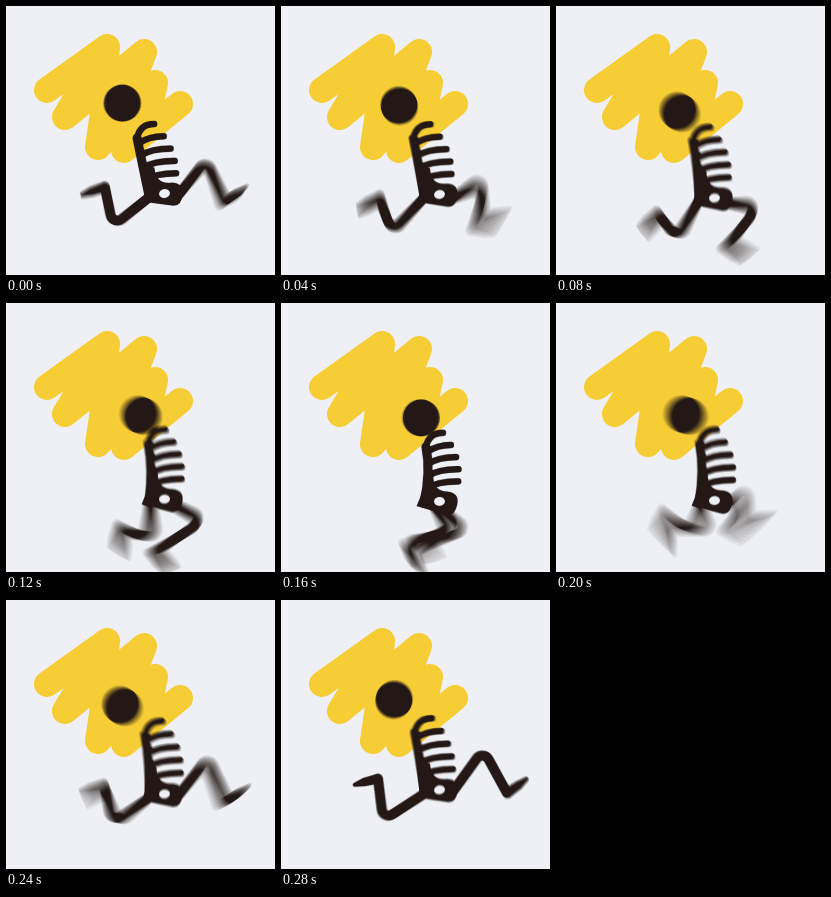
An HTML page with a canvas that plays this animation: 269 px wide and 269 px high, repeating every 0.32 s.

```html
<!DOCTYPE html>
<html lang="en">
<head>
<meta charset="utf-8">
<title>Running skeleton</title>
<style>
  html, body { margin: 0; width: 100%; height: 100%; overflow: hidden; background: #eef0f5; }
  canvas { display: block; width: 100vw; height: 100vh; }
</style>
</head>
<body>
<canvas id="stage" width="269" height="269"></canvas>
<script>
const SIZE = 269, LOOP = 320, STEP = 40, TAU = 2 * Math.PI;
const SHUTTER = 26, SAMPLES = 16;
const INK = '#231815', YELLOW = '#f7cd35', PAPER = '#eef0f5';

const newLayer = () => {
  const canvas = document.createElement('canvas');
  canvas.width = canvas.height = SIZE;
  return canvas.getContext('2d');
};
const stage = document.getElementById('stage').getContext('2d');
const figure = newLayer();
const exposure = newLayer();

const SCRIBBLE = new Path2D(
  'M41 84L101 41L59 111L97 80L101 41M97 80L138 46L128 72L98 100L92 141L149 77L143 105L118 144L174 98');

// Pelvis outline around its hole
const PELVIS = new Path2D(
  'M-22 8Q-17 -8 -18 -28L-10 -26Q-9 -9 7 -11Q19 -11 18 1Q17 13 8 12Q-8 10 -22 8Z');

// Closed paths of the joints over one stride, which takes two loops
const KNEE = [[200, 154], [202, 201], [183, 228], [108, 223], [107, 220], [121, 232], [170, 227], [201, 159]];
const ANKLE = [[218, 195], [172, 239], [128, 246], [99, 187], [99, 181], [103, 209], [138, 237], [219, 201]];

// Point on a smooth closed curve through the given points, phase 0 to 1
function along(points, phase) {
  const n = points.length, k = (phase % 1 + 1) % 1 * n;
  const i = Math.floor(k), u = k - i;
  const [a, b, c, d] = [-1, 0, 1, 2].map(j => points[(i + j + n) % n]);
  return [0, 1].map(q => b[q] + u / 2 * (c[q] - a[q]
    + u * (2 * a[q] - 5 * b[q] + 4 * c[q] - d[q] + u * (3 * (b[q] - c[q]) + d[q] - a[q]))));
}

function bodyAt(time) {
  const w = TAU * time / LOOP;
  const cos = Math.cos(w), sin = Math.sin(w), cos2 = Math.cos(2 * w);
  return {
    head: [124 - 12 * cos + 3.7 * sin + 4.4 * cos2, 106 - 9 * cos],
    neck: [136 - 7 * cos - sin, 130.5 - 6 * cos + 1.5 * cos2],
    pelvis: [158.5, 193 - 5.5 * cos - sin],
    lean: .5 - .5 * cos
  };
}

function drawLeg(c, time, pelvisY) {
  const phase = time / (2 * LOOP);
  const knee = along(KNEE, phase), ankle = along(ANKLE, phase);
  const swing = Math.max(-1, Math.min(1, 2 * Math.cos(TAU * phase)));
  c.lineWidth = 10;
  c.beginPath();
  c.moveTo(155.5 + 14 * swing, pelvisY + 5);
  c.arcTo(...knee, ...ankle, 7);
  c.lineTo(...ankle);
  c.stroke();

  // The foot stands square to the shin and tapers to the toe
  const shin = Math.atan2(ankle[1] - knee[1], ankle[0] - knee[0]);
  c.save();
  c.translate(...ankle);
  c.rotate(shin - 1.7);
  c.lineWidth = 4;
  c.beginPath();
  c.moveTo(0, -3);
  c.lineTo(14, -2);
  c.lineTo(24, 0);
  c.lineTo(14, 2.5);
  c.lineTo(0, 3);
  c.closePath();
  c.fill();
  c.stroke();
  c.restore();
}

function drawTorso(c, { neck, pelvis, lean }) {
  const [nx, ny] = neck, length = pelvis[1] - ny;
  const top = [nx + 2, ny + 6], hip = [143, pelvis[1] + 2];
  const bend = [nx + 7, (ny + hip[1]) / 2 - 1];

  c.lineWidth = 9;
  c.beginPath();
  c.moveTo(...top);
  c.quadraticCurveTo(...bend, ...hip);
  c.stroke();

  // Five ribs; the highest one hooks over from the end of the spine
  c.lineWidth = 6.5;
  for (let i = 0; i < 5; i++) {
    const u = i * .18, v = 1 - u;
    const x = top[0] * v * v + 2 * bend[0] * u * v + hip[0] * u * u;
    const tipX = nx + 20 + 22 * (1 - (1 - i / 4) ** 2) - 1.7 * lean * i;
    const tipY = ny - 8 + .2 * length * i;
    const rise = i ? 7 : 14;
    c.beginPath();
    c.moveTo(x, tipY + rise);
    c.quadraticCurveTo(x + (i ? 10 : 3), tipY, tipX - 1, tipY);
    c.stroke();
  }

  c.save();
  c.translate(...pelvis);
  c.rotate(lean * .15);
  c.fill(PELVIS);
  c.globalCompositeOperation = 'destination-out';
  c.beginPath();
  c.ellipse(0, 0, 5.5, 4.5, -.2, 0, TAU);
  c.fill();
  c.restore();
}

function drawFigure(c, time) {
  const body = bodyAt(time);
  c.clearRect(0, 0, SIZE, SIZE);
  c.lineCap = c.lineJoin = 'round';
  drawLeg(c, time, body.pelvis[1]);
  drawLeg(c, time + LOOP, body.pelvis[1]);
  drawTorso(c, body);
  c.beginPath();
  c.arc(...body.head, 18.5, 0, TAU);
  c.fill();
}

function draw(time) {
  stage.fillStyle = PAPER;
  stage.fillRect(0, 0, SIZE, SIZE);
  stage.strokeStyle = YELLOW;
  stage.lineWidth = 26;
  stage.lineCap = stage.lineJoin = 'round';
  stage.stroke(SCRIBBLE);

  // Motion blur: average several moments around this one, then tint
  exposure.clearRect(0, 0, SIZE, SIZE);
  exposure.globalCompositeOperation = 'lighter';
  exposure.globalAlpha = 1 / SAMPLES;
  for (let i = 0; i < SAMPLES; i++) {
    drawFigure(figure, time + SHUTTER * (i / (SAMPLES - 1) - .5));
    exposure.drawImage(figure.canvas, 0, 0);
  }
  exposure.globalCompositeOperation = 'source-in';
  exposure.globalAlpha = 1;
  exposure.fillStyle = INK;
  exposure.fillRect(0, 0, SIZE, SIZE);
  stage.drawImage(exposure.canvas, 0, 0);
}

function tick() {
  draw(Math.floor(performance.now() % LOOP / STEP) * STEP);
  requestAnimationFrame(tick);
}
tick();
</script>
</body>
</html>
```
